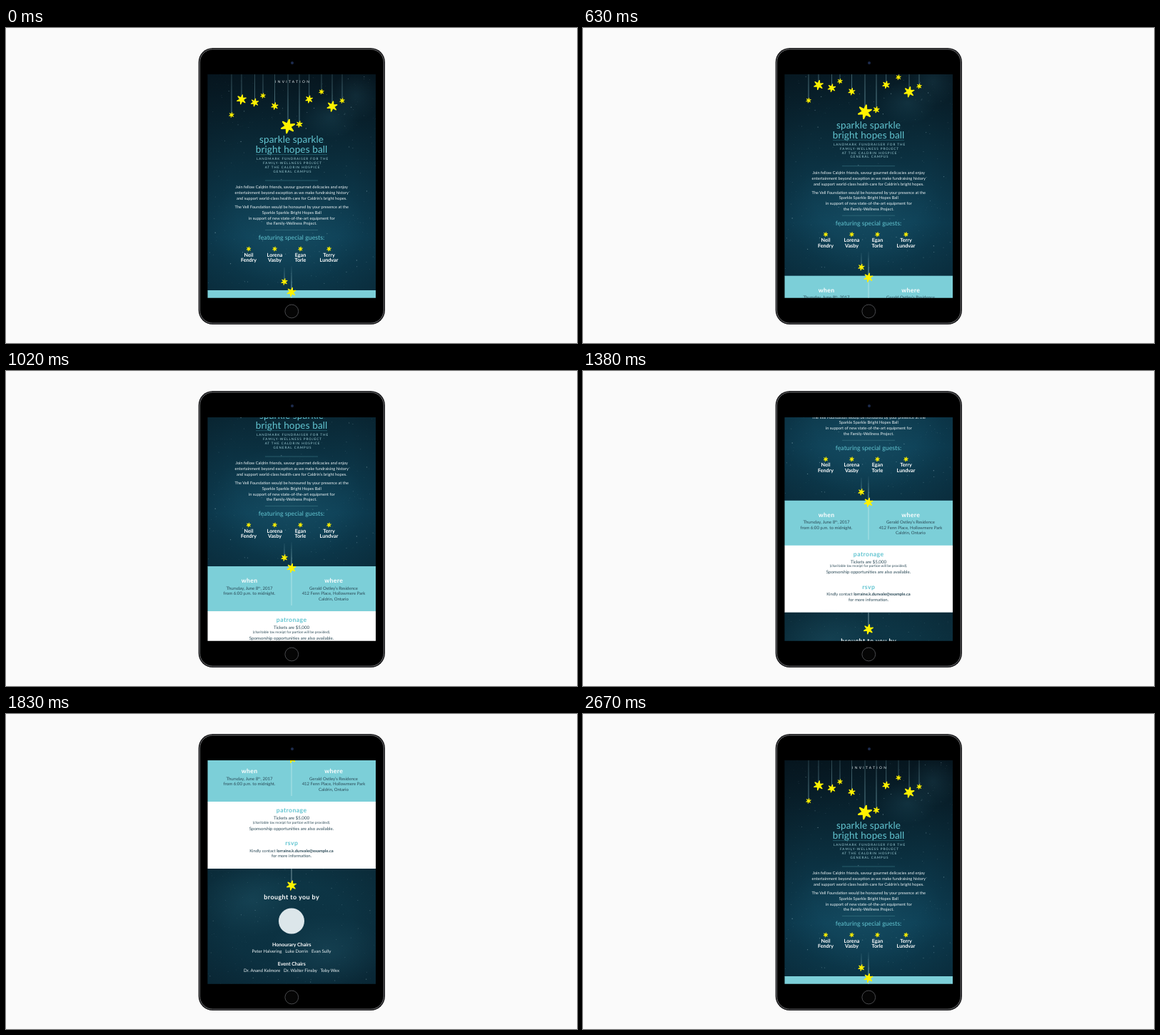
Write an HTML page that moves like this. It is 800x442 px and loops after 2.7 s.

```html
<!DOCTYPE html>
<html lang="en">
<head>
<meta charset="utf-8">
<title>Gala invitation on a tablet</title>
<style>
html, body { margin: 0; width: 100%; height: 100%; overflow: hidden; background: #fafafa; }
svg { display: block; width: 100%; height: 100%; }
text { font-family: Lato, "Open Sans", sans-serif; text-anchor: middle; text-rendering: geometricPrecision; white-space: pre; }
</style>
</head>
<body>
<svg viewBox="0 0 800 442">
  <defs>
    <clipPath id="screen"><rect x="282.5" y="65" width="235.5" height="313.8"/></clipPath>
    <linearGradient id="sky" x2="0" y2="1">
      <stop offset="0" stop-color="#06161f"/>
      <stop offset=".35" stop-color="#0a2a38"/>
      <stop offset=".75" stop-color="#0d4056"/>
      <stop offset="1" stop-color="#0c394c"/>
    </linearGradient>
    <linearGradient id="dusk" x2="0" y2="1">
      <stop offset="0" stop-color="#0d3646"/>
      <stop offset="1" stop-color="#0b2f3f"/>
    </linearGradient>
    <radialGradient id="edge" r=".72">
      <stop offset=".5" stop-color="#06141d" stop-opacity="0"/>
      <stop offset="1" stop-color="#06141d" stop-opacity=".35"/>
    </radialGradient>
    <radialGradient id="glow">
      <stop offset="0" stop-color="#3f8399" stop-opacity=".16"/>
      <stop offset="1" stop-color="#3f8399" stop-opacity="0"/>
    </radialGradient>
    <linearGradient id="cord" gradientUnits="userSpaceOnUse" x1="0" y1="65" x2="0" y2="115">
      <stop offset="0" stop-color="#7fb0ba" stop-opacity=".4"/>
      <stop offset="1" stop-color="#7fb0ba" stop-opacity=".9"/>
    </linearGradient>
    <linearGradient id="thread" gradientUnits="userSpaceOnUse" x1="0" y1="334" x2="0" y2="362">
      <stop offset="0" stop-color="#8fc3cd" stop-opacity=".1"/>
      <stop offset="1" stop-color="#a5d3da"/>
    </linearGradient>
  </defs>
  <rect x="269.7" y="28" width="261.3" height="388" rx="20" fill="#121214"/>
  <rect x="271.5" y="29.8" width="257.7" height="384.4" rx="18.2" fill="#000" stroke="#8b8c8f" stroke-width=".8"/>
  <circle cx="401" cy="49" r="2" fill="#1d2c4e"/>
  <circle cx="400.3" cy="397.5" r="9.4" fill="#050505" stroke="#505154" stroke-width=".9"/>
  <g clip-path="url(#screen)"><g id="page"></g></g>
</svg>
<script>
const LOOP = 2700, STEP = 30, TRAVEL = 308;
const AQUA = '#63c5d1', PALE = '#eef5f7', INK = '#2b4a57', BAND = '#7ccfd8';
const page = document.getElementById('page');

let seed = 7;
const random = () => (seed = seed * 16807 % 2147483647) / 2147483647;

const text = (x, y, size, fill, str, weight = 400, gap = 0) =>
  `<text x="${x + gap / 2}" y="${y}" font-size="${size}" fill="${fill}" font-weight="${weight}" letter-spacing="${gap}">${str}</text>`;

const lines = (x, ys, size, fill, strs, weight, gap) =>
  strs.map((s, i) => text(x, ys[i], size, fill, s, weight, gap)).join('');

const rect = (y, h, fill) => `<rect x="282" y="${y}" width="237" height="${h}" fill="${fill}"/>`;

const line = (x1, y1, x2, y2, color, width = .7) =>
  `<path d="M${x1} ${y1}L${x2} ${y2}" stroke="${color}" stroke-width="${width}"/>`;

const glow = (x, y, rx, ry) => `<ellipse cx="${x}" cy="${y}" rx="${rx}" ry="${ry}" fill="url(#glow)"/>`;

// Six slim arms with rounded tips, slightly turned.
function star(x, y, r, tilt = .2) {
  const points = Array.from({ length: 12 }, (_, i) => {
    const a = i * Math.PI / 6 + tilt, d = i % 2 ? r * .32 : r * .9;
    return `${(x + d * Math.sin(a)).toFixed(2)},${(y - d * Math.cos(a)).toFixed(2)}`;
  });
  return `<polygon points="${points.join(' ')}" fill="#fff200" stroke="#fff200" stroke-width="${r * .2}" stroke-linejoin="round"/>`;
}

const hanging = (x, top, y, r, color) => line(x, top, x, y - r * .6, color) + star(x, y, r);

function specks(count, top, height) {
  let out = '';
  for (let i = 0; i < count; i++) {
    const x = 282 + random() * 237, y = top + random() * height;
    const r = .2 + random() ** 4 * .5, alpha = .1 + random() * .4;
    out += `<circle cx="${x.toFixed(1)}" cy="${y.toFixed(1)}" r="${r.toFixed(2)}" fill="#a9cbd4" opacity="${alpha.toFixed(2)}"/>`;
  }
  return out;
}

const mobile = [
  [316, 122, 4], [330, 100.3, 7.2], [348.5, 104.5, 6], [360, 95, 4], [376.5, 109.5, 5.3], [395, 138, 10.5],
  [411, 135, 5], [424.7, 100, 5.6], [442, 89.5, 4], [457, 110, 7.8], [471, 102, 4]
];
const guests = [
  [340, 'Neil', 'Fendry'], [376.5, 'Lorena', 'Vasby'], [412.5, 'Egan', 'Torle'], [452.5, 'Terry', 'Lundvar']
];

page.innerHTML = [
  // Night sky and invitation
  rect(65, 304, 'url(#sky)'), rect(65, 304, 'url(#edge)'),
  glow(455, 125, 40, 30), glow(490, 95, 35, 35), glow(395, 280, 110, 80), specks(480, 65, 303),
  text(401, 76.6, 4.9, PALE, 'INVITATION', 400, 2.3),
  ...mobile.map(([x, y, r]) => hanging(x, 65, y, r, 'url(#cord)')),
  lines(400, [161, 175], 13.6, AQUA, ['sparkle sparkle', 'bright hopes ball'], 400, .1),
  line(350, 177.6, 450, 177.6, '#2f7583', .6),
  lines(401, [185.3, 191.1, 197, 202.8], 4.6, '#a3d2db', [
    'LANDMARK FUNDRAISER FOR THE', 'FAMILY-WELLNESS PROJECT', 'AT THE CALDRIN HOSPICE', 'GENERAL CAMPUS'
  ], 400, .95),
  line(363, 214, 437, 214, '#3c7986', .6),
  lines(400.3, [225.4, 233.2, 241, 253, 260.7, 268.5, 276.2], 5.7, PALE, [
    'Join fellow Caldrin friends, savour gourmet delicacies and enjoy',
    'entertainment beyond exception as we make fundraising history',
    'and support world-class health-care for Caldrin’s bright hopes.',
    'The Vell Foundation would be honoured by your presence at the',
    'Sparkle Sparkle Bright Hopes Ball',
    'in support of new state-of-the-art equipment for',
    'the Family-Wellness Project.'
  ]),
  line(363, 283.5, 437, 283.5, '#3c7986', .6),
  text(400, 297, 8.8, AQUA, 'featuring special guests:'),
  ...guests.map(([x, first, last]) =>
    star(x, 310, 3.6) + lines(x, [320.5, 328], 7.2, '#fff', [first, last], 700)),

  // Date and place
  rect(368, 63.3, BAND),
  line(400, 377, 400, 423, '#c6eaee', .7),
  hanging(390, 336, 356, 5, 'url(#thread)'),
  hanging(400, 334, 370.5, 6.8, 'url(#thread)'),
  text(341, 391.3, 8.7, '#fff', 'when', 700, .35),
  text(459, 391.3, 8.7, '#fff', 'where', 700, .35),
  lines(341, [400.6, 408.4], 6.1, INK, [
    'Thursday, June 8<tspan font-size="3.5" dy="-2">th</tspan><tspan dy="2">, 2017</tspan>',
    'from 6:00 p.m. to midnight.'
  ]),
  lines(459, [400.6, 408.2, 415.6], 6, INK, [
    'Gerald Ostley’s Residence', '412 Fenn Place, Hollowmere Park', 'Caldrin, Ontario'
  ]),

  // Tickets and reply
  rect(431, 94.2, '#fff'),
  text(400, 446.4, 8.7, AQUA, 'patronage', 700, .4),
  text(400, 455.8, 6.2, INK, 'Tickets are $5,000'),
  text(400, 461.7, 4.9, INK, '(charitable tax receipt for portion will be provided).'),
  text(400, 470.6, 6.1, INK, 'Sponsorship opportunities are also available.'),
  text(400, 492.2, 8.7, AQUA, 'rsvp', 700, .4),
  text(400, 501.6, 5.8, INK, 'Kindly contact <tspan font-weight="700">lorraine.k.dunvale@example.ca</tspan>'),
  text(400, 509.2, 6, INK, 'for more information.'),

  // Hosts
  rect(525, 163, 'url(#dusk)'), rect(525, 163, 'url(#edge)'),
  glow(345, 570, 70, 50), glow(450, 640, 80, 50), specks(250, 525, 162),
  hanging(400, 525, 548.6, 7.3, '#a9c4cc'),
  text(400, 568, 9, '#fff', 'brought to you by', 700, .4),
  '<circle cx="400" cy="598.5" r="18" fill="#dce6ea"/>',
  text(400.3, 634, 7, '#fff', 'Honourary Chairs', 700),
  text(400, 643.4, 6.2, PALE, 'Peter Halvering   Luke Dorrin   Evan Sully'),
  text(400.3, 661, 7, '#fff', 'Event Chairs', 700),
  text(400, 670.3, 6.2, PALE, 'Dr. Anand Kelmore   Dr. Walter Finsby   Toby Wex')
].join('');

// Cubic Bézier (1/3, 0, 5/6, 5/6): slow start, steady arrival.
function ease(x) {
  if (x <= 0 || x >= 1) return x <= 0 ? 0 : 1;
  const rise = t => 2.5 * t * t * (1 - t) + t ** 3;
  let lo = 0, hi = 1;
  for (let i = 0; i < 24; i++) {
    const t = (lo + hi) / 2;
    if (t * (1 - t) ** 2 + rise(t) < x) lo = t; else hi = t;
  }
  return rise(lo);
}

const start = performance.now();
function draw() {
  const elapsed = (performance.now() - start) % LOOP;
  const time = Math.floor(elapsed / STEP) * STEP;
  const scroll = TRAVEL * (ease((time - 360) / 1470) - ease((time - 2280) / 390));
  page.setAttribute('transform', `translate(0 ${-scroll.toFixed(2)})`);
  requestAnimationFrame(draw);
}
draw();
</script>
</body>
</html>
```
